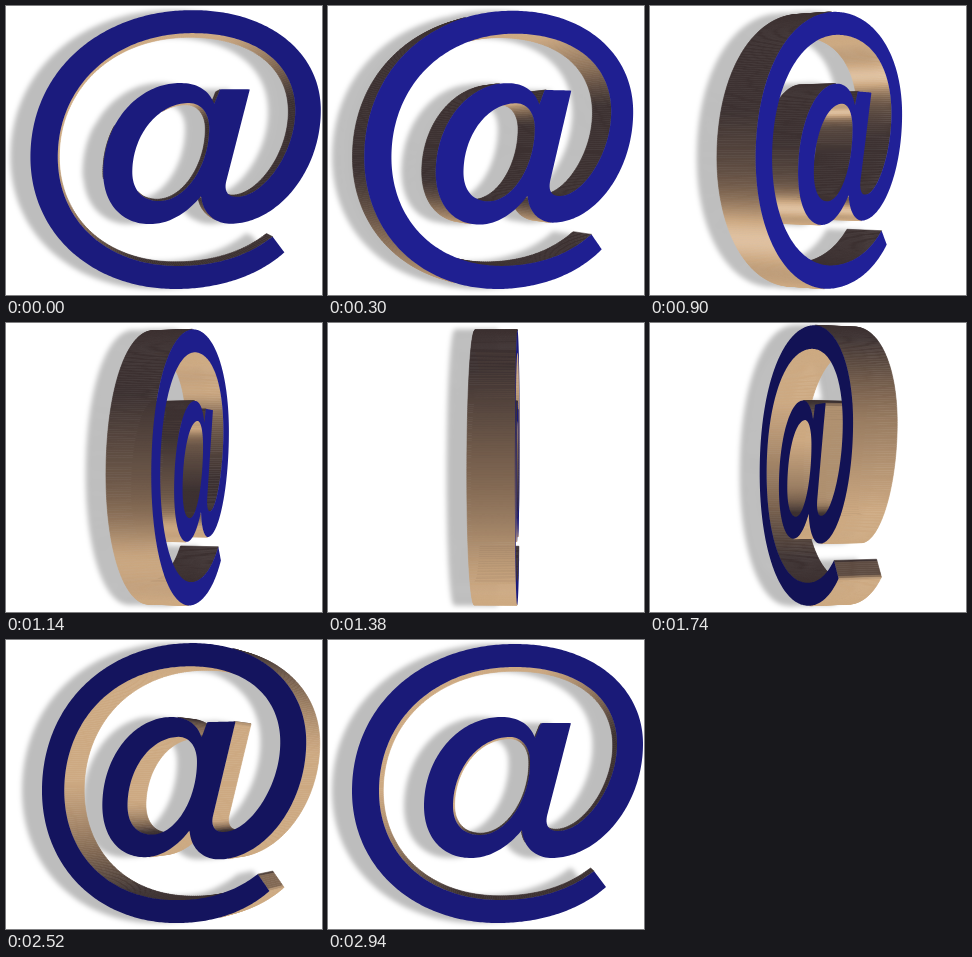
Write an HTML page with a canvas that moves like this. It is 316 by 289 pixels and loops after 3 s.

```html
<!DOCTYPE html>
<html lang="en">
<head>
<meta charset="utf-8">
<title>Turning at sign</title>
<style>
  html, body { margin: 0; width: 100%; height: 100%; overflow: hidden; background: #fff; }
  canvas { display: block; filter: drop-shadow(-20px 0 2.5px rgba(0, 0, 0, .26)); }
</style>
</head>
<body>
<canvas id="stage" width="316" height="289"></canvas>
<script>
const ctx = document.getElementById('stage').getContext('2d');
const CX = 169.7, CY = 144;         // rotation centre on the stage
const DIST = 1150;                  // camera distance
const FRONT = 19.8, BACK = -22.3;   // depth of the two faces
const FRAME = 60, COUNT = 50;
const RAD = Math.PI / 180;

// Front view of the sign; the solid lies to the right of each contour
const BODY = `M278 247 C252 270 213 283 170 283 C86 283 24 228 24 151
  C24 64 95 4 187 4 C262 4 315 45 315 104 C315 166 270 219 222 218
  C206 217 195 206 194 190 C180 207 162 218 143 218 C114 218 96 197 96 166
  C96 117 131 77 173 77 C190 77 202 84 207 98 L213 83 L243 83 L219 176
  C217 186 221 191 230 191 C256 191 289 148 289 104 C289 56 248 27 187 27
  C107 27 51 80 51 151 C51 215 100 260 172 260 C210 260 242 250 266 231 Z`;
const BOWL = `M182 97 C150 97 125 130 125 166 C125 184 135 195 152 195
  C178 195 202 160 202 122 C202 106 193 97 182 97 Z`;

function sample(d) {
  const path = document.createElementNS('http://www.w3.org/2000/svg', 'path');
  path.setAttribute('d', d);
  const length = path.getTotalLength(), n = Math.round(length / 2.2);
  const shrink = 1 - FRONT / DIST;
  return Array.from({ length: n }, (_, i) => {
    const p = path.getPointAtLength(length * i / n);
    return { x: (p.x - CX) * shrink, y: (p.y - CY) * shrink };
  });
}

const contours = [BODY, BOWL].map(sample);

const RAMP = [[48, 40, 44], [128, 103, 82], [205, 169, 130], [252, 230, 206]];

function wallColor(nx, ny, nz) {
  const diffuse = Math.min(1, Math.max(.08, .5 + .5 * nx + .58 * ny));
  const gloss = Math.max(0, -.48 * nx + .56 * ny + .68 * nz) ** 25;
  const v = Math.min(1.5, diffuse + .55 * gloss) * 2;
  const i = Math.min(2, Math.floor(v)), f = v - i;
  return `rgb(${RAMP[i].map((a, k) => Math.round(a + (RAMP[i + 1][k] - a) * f))})`;
}

function faceColor(angle) {
  const blue = 85 + 70 * Math.max(0, Math.cos(angle - 45 * RAD)) ** 2;
  const dim = Math.round(blue * .215);
  return `rgb(${dim}, ${dim}, ${Math.round(blue)})`;
}

function turnAt(frame) {
  const base = 3.6 * (frame + 1);
  const deg = base + 1.7 * Math.sin(base * RAD);
  return (deg > 90 ? deg - 180 : deg) * RAD;
}

function normal(p, q) {
  const dx = q.x - p.x, dy = q.y - p.y, len = Math.hypot(dx, dy) || 1;
  return [dy / len, -dx / len];
}

function draw(frame) {
  const angle = turnAt(frame), c = Math.cos(angle), s = Math.sin(angle);

  const project = (p, z) => {
    const x = p.x * c + z * s, depth = z * c - p.x * s;
    const k = DIST / (DIST - depth);
    return { X: CX + x * k, Y: CY + p.y * k, x, depth };
  };

  const walls = [], faces = [];
  for (const points of contours) {
    const n = points.length;
    const front = points.map(p => project(p, FRONT));
    const back = points.map(p => project(p, BACK));
    faces.push(front);
    points.forEach((p, i) => {
      const j = (i + 1) % n, f = front[i];
      const [nx, ny] = normal(p, points[j]);
      if (-nx * s * (DIST - f.depth) - nx * c * f.x - ny * p.y <= 0) return;
      // a wider span evens out the shading
      const [sx, sy] = normal(points[(i + n - 1) % n], points[(i + 2) % n]);
      walls.push({
        quad: [f, front[j], back[j], back[i]],
        depth: f.depth + back[i].depth,
        color: wallColor(sx * c, sy, -sx * s)
      });
    });
  }
  walls.sort((a, b) => a.depth - b.depth);

  const trace = pts => {
    pts.forEach((p, i) => i ? ctx.lineTo(p.X, p.Y) : ctx.moveTo(p.X, p.Y));
    ctx.closePath();
  };

  ctx.clearRect(0, 0, 316, 289);
  ctx.lineWidth = .6;
  ctx.lineJoin = 'round';
  for (const wall of walls) {
    ctx.fillStyle = ctx.strokeStyle = wall.color;
    ctx.beginPath();
    trace(wall.quad);
    ctx.fill();
    ctx.stroke();
  }
  ctx.fillStyle = faceColor(angle);
  ctx.beginPath();
  faces.forEach(trace);
  ctx.fill('evenodd');
}

const start = performance.now();
let shown = -1;
function tick() {
  const frame = Math.floor((performance.now() - start) / FRAME) % COUNT;
  if (frame !== shown) draw(shown = frame);
  requestAnimationFrame(tick);
}
tick();
</script>
</body>
</html>
```
